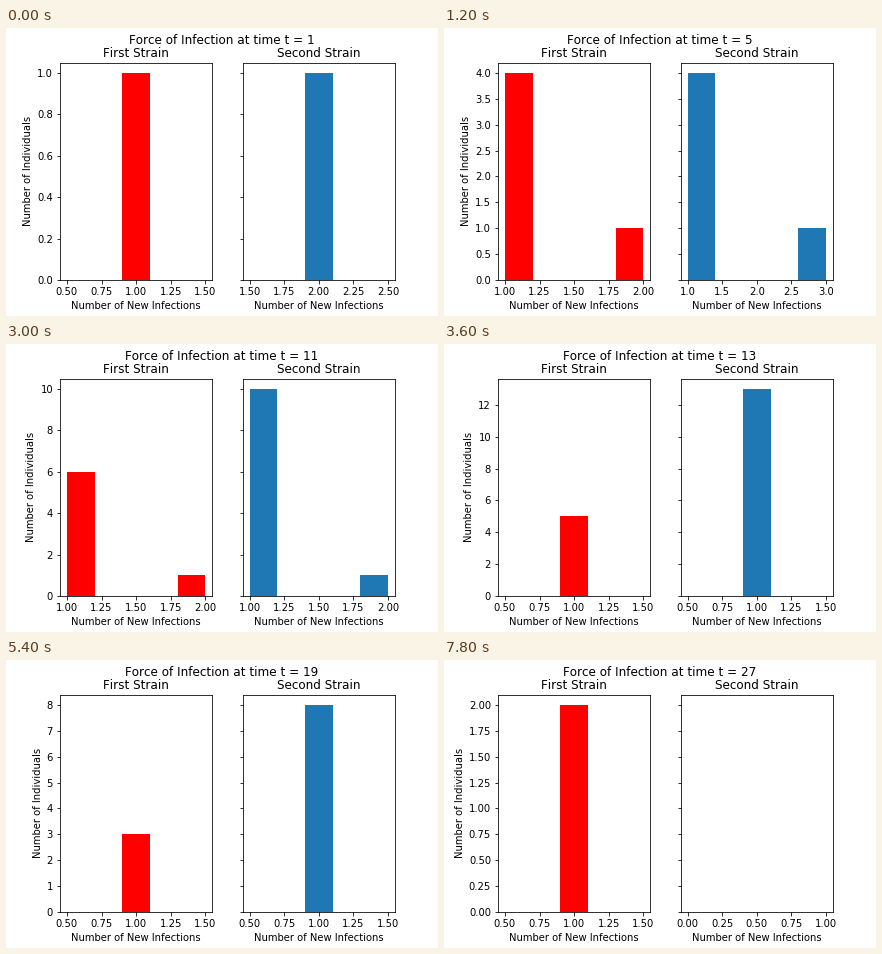
Animation of 432x288 px, one loop 8000 ms. Source, as a matplotlib script:

```python
import matplotlib.pyplot as plt
import numpy as np
from matplotlib.animation import FuncAnimation

INTERVAL = 100   # ms per frame
HOLD = 3         # frames per time step
FRAMES = 80

plt.rcParams.update({
    "font.family": "DejaVu Sans",
    "font.size": 10,
    "text.kerning_factor": 6,   # kern in whole pixels
    "figure.subplot.bottom": 0.125,
})
fig = plt.figure(figsize=(6, 4), dpi=72, facecolor="white")


# Each epidemic grows by one individual per step, then dies down.
def first_size(t):
    return np.interp(t, [1, 9, 15, 24, 25], [1, 9, 3, 3, 2])


def second_size(t):
    return np.interp(t, [1, 14, 15, 22, 23, 27], [1, 14, 14, 4, 4, 0])


# New infections caused by the most infectious individual.
def first_peak(t):
    return 2 if t < 15 and t % 6 == 5 else 1


def second_peak(t):
    if t > 12:
        return 1
    return 3 if t % 5 == 0 else 2


STRAINS = [
    ("First Strain", "red", first_size, first_peak),
    ("Second Strain", "tab:blue", second_size, second_peak),
]


def infections(size, peak):
    """Everyone infects one other, except the most infectious individual."""
    return [1] * (size - 1) + [peak] if size else []


def draw(frame):
    t = 1 + frame // HOLD
    fig.clear()
    axes = fig.subplots(1, 2, sharey=True)
    fig.suptitle(f"Force of Infection at time t = {t}", fontsize=12)
    for ax, (title, color, size, peak) in zip(axes, STRAINS):
        ax.hist(infections(round(size(t)), peak(t)), bins=5, color=color)
        ax.set_title(title, fontsize=12)
        ax.set_xlabel("Number of New Infections")
    axes[0].set_ylabel("Number of Individuals")
    return []


anim = FuncAnimation(fig, draw, frames=FRAMES, interval=INTERVAL,
                     repeat=True, repeat_delay=0)
plt.show()
```
